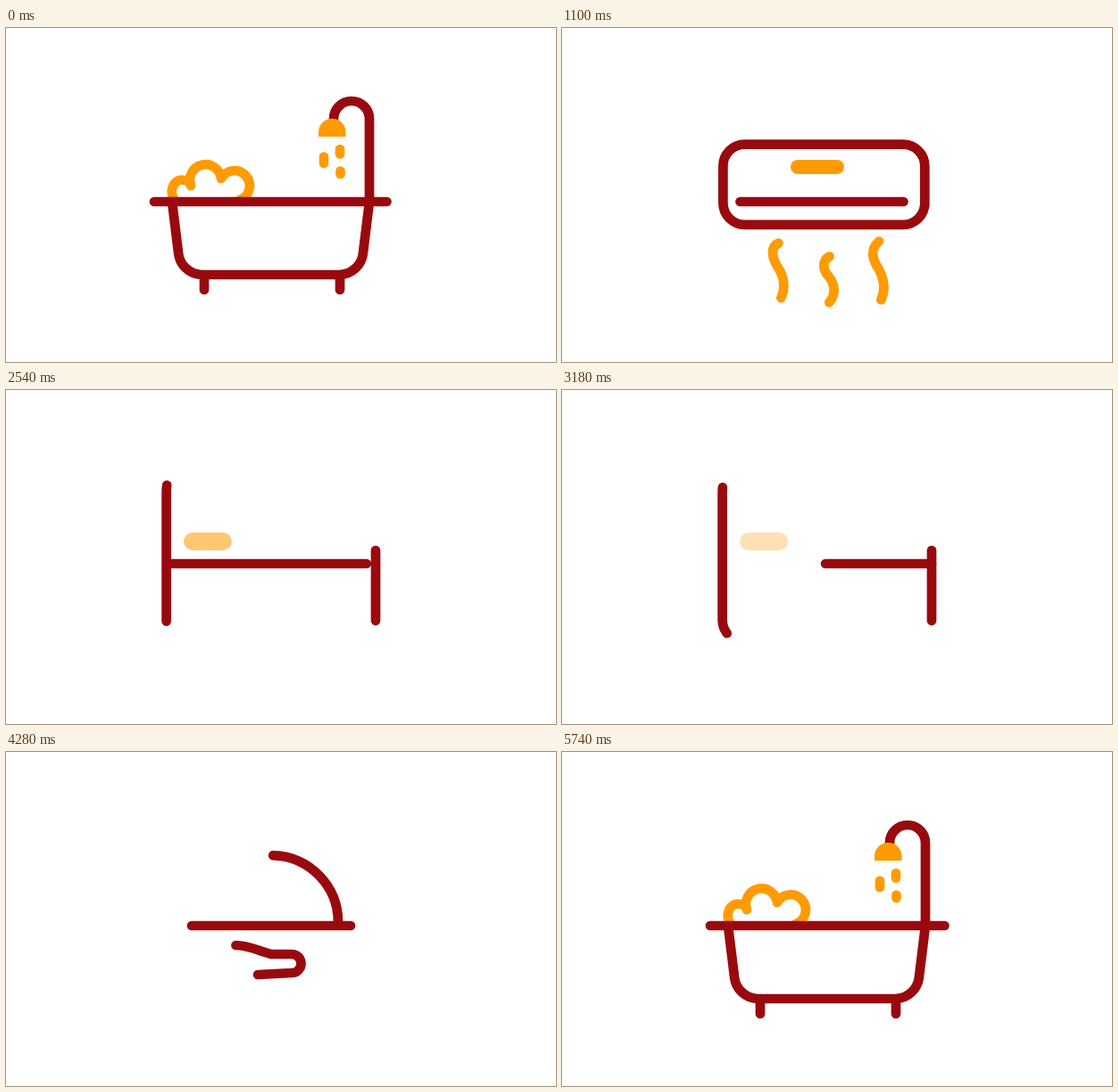
These frames come from a looping animation (616 by 375 pixels, 5.76 s). An HTML page without scripts:

```html
<!DOCTYPE html>
<html lang="en">
<head>
<meta charset="utf-8">
<title>Hotel comforts</title>
<style>
html, body { margin: 0; width: 100%; height: 100%; overflow: hidden; background: #fff; }
svg { display: block; width: 616px; height: 375px; }
path, circle { animation: 5.76s ease-in-out infinite; }
.line {
  fill: none; stroke: #990a0e; stroke-width: 10.7;
  stroke-linecap: round; stroke-linejoin: round;
  stroke-dasharray: 0 999; visibility: hidden;
}
.warm { stroke: #ff9b00; }
.fill { fill: #ff9b00; opacity: 0; }
.solid { stroke-dasharray: none; visibility: visible; opacity: 0; }

/* shared horizontal bar */
.rail { animation-name: rail; stroke-dasharray: none; }
@keyframes rail {
  0% { d: path("M166 195H426.5"); visibility: visible; }
  11.1% { d: path("M167.5 195H424.5"); }
  18.4%, 29% { d: path("M199.5 195H382.5"); visibility: visible; }
  35.5% { d: path("M382 195H382.5"); visibility: hidden; }
  39% { d: path("M180 195H180.5"); visibility: hidden; }
  45%, 52.5% { d: path("M180 195H414"); visibility: visible; }
  55.2% { d: path("M295 195H414"); visibility: visible; }
  58% { d: path("M413.5 195H414"); visibility: hidden; }
  60% { d: path("M208 195H208.5"); visibility: hidden; }
  66%, 74.3% { d: path("M208 195H386"); visibility: visible; }
  80.5% { d: path("M169.5 195H424.7"); }
  84%, 100% { d: path("M166 195H428.5"); visibility: visible; }
}

/* bath */
.tub { animation-name: tub; }
@keyframes tub {
  0%, 88%, 100% { stroke-dasharray: 101 999; stroke-dashoffset: 0; visibility: visible; }
  10.4% { stroke-dasharray: 0 999; stroke-dashoffset: -100; visibility: hidden; }
  77.5% { stroke-dasharray: 0 999; stroke-dashoffset: 0; visibility: hidden; }
}
.pipe { animation-name: pipe; }
@keyframes pipe {
  0%, 83%, 100% { stroke-dasharray: 101 999; visibility: visible; }
  10.4%, 76% { stroke-dasharray: 0 999; visibility: hidden; }
}
.foot { animation-name: foot; }
@keyframes foot {
  0%, 89.5%, 100% { stroke-dasharray: 101 999; visibility: visible; }
  5%, 86% { stroke-dasharray: 0 999; visibility: hidden; }
}
.cloud { animation-name: cloud; }
@keyframes cloud {
  0%, 92.5%, 100% { stroke-dasharray: 101 999; visibility: visible; }
  8%, 84% { stroke-dasharray: 0 999; visibility: hidden; }
}
.head { animation-name: head; transform-origin: 365px 103px; }
@keyframes head {
  0%, 87%, 100% { opacity: 1; transform: none; }
  6%, 83% { opacity: 0; transform: scale(.3); }
}
.drop { animation-name: drop; }
@keyframes drop {
  0%, 97%, 100% { opacity: 1; transform: none; }
  5% { opacity: 0; transform: translateY(8px); }
  89% { opacity: 0; transform: translateY(-18px); }
}

/* air conditioner */
.case { animation-name: case; }
@keyframes case {
  11% { stroke-dasharray: 0 999; visibility: hidden; }
  18.7%, 28.5% { stroke-dasharray: 101 999; stroke-dashoffset: 0; visibility: visible; }
  36% { stroke-dasharray: 0 999; stroke-dashoffset: -97; visibility: hidden; }
}
/* --in: share drawn at first, --out: share erased later */
.wave { animation-name: wave; }
@keyframes wave {
  13.5% { stroke-dasharray: 0 999; visibility: hidden; }
  19.1% { stroke-dasharray: var(--in) 999; visibility: visible; }
  21%, 29.5% { stroke-dasharray: 101 999; stroke-dashoffset: 0; visibility: visible; }
  36.1% { stroke-dasharray: 101 999; stroke-dashoffset: calc(-1px * var(--out)); visibility: visible; }
  37.5% { stroke-dasharray: 101 999; stroke-dashoffset: -100px; visibility: hidden; }
}
.button { animation-name: button; stroke-width: 16; }
@keyframes button {
  0%, 14%, 34%, 100% { opacity: 0; }
  18%, 30% { opacity: 1; }
}

/* bed */
.post { animation-name: post; }
@keyframes post {
  33% { stroke-dasharray: 0 999; stroke-dashoffset: 0; visibility: hidden; }
  36.1% { stroke-dasharray: 126 999; stroke-dashoffset: -153; visibility: visible; }
  40%, 54.2% { stroke-dasharray: 153 999; stroke-dashoffset: -237.5; visibility: visible; }
  55.2% { stroke-dasharray: 165 999; stroke-dashoffset: -240; visibility: visible; }
  59.6% { stroke-dasharray: 0 999; stroke-dashoffset: -524; visibility: hidden; }
}
.end { animation-name: end; }
@keyframes end {
  35.7% { stroke-dasharray: 0 999; stroke-dashoffset: 0; visibility: hidden; }
  36.1% { stroke-dasharray: 10 999; stroke-dashoffset: 0; visibility: visible; }
  42.5%, 56% { stroke-dasharray: 79 999; stroke-dashoffset: -246; visibility: visible; }
  60.8% { stroke-dasharray: 170 999; stroke-dashoffset: -330; visibility: visible; }
  66% { stroke-dasharray: 0 999; stroke-dashoffset: -630; visibility: hidden; }
}
.pillow { animation-name: pillow; stroke-width: 20; }
@keyframes pillow {
  0%, 42%, 56%, 100% { opacity: 0; }
  46%, 53% { opacity: 1; }
  55.2% { opacity: .3; }
}

/* served dish */
.dome { animation-name: dome; }
@keyframes dome {
  61.5% { stroke-dasharray: 0 999; visibility: hidden; }
  67.5%, 72.2% { stroke-dasharray: 101 999; stroke-dashoffset: 0; visibility: visible; }
  76.4% { stroke-dasharray: 0 999; stroke-dashoffset: -100; visibility: hidden; }
}
.thumb { animation-name: thumb; }
@keyframes thumb {
  62.5% { stroke-dasharray: 0 999; visibility: hidden; }
  68.5%, 72% { stroke-dasharray: 188 999; stroke-dashoffset: 0; visibility: visible; }
  74.3% { stroke-dasharray: 137 999; stroke-dashoffset: -51; visibility: visible; }
  78% { stroke-dasharray: 0 999; stroke-dashoffset: -186; visibility: hidden; }
}
.palm { animation-name: palm; }
@keyframes palm {
  59% { stroke-dasharray: 0 999; visibility: hidden; }
  67%, 70.8% { stroke-dasharray: 101 999; stroke-dashoffset: 0; visibility: visible; }
  74.2% { stroke-dasharray: 0 999; stroke-dashoffset: -100; visibility: hidden; }
}
.knob { animation-name: knob; }
@keyframes knob {
  0%, 66%, 73.5%, 100% { opacity: 0; }
  69%, 71% { opacity: 1; }
}
</style>
</head>
<body>
<svg viewBox="0 0 616 375">
  <g>
    <path class="line warm cloud" pathLength="100" d="M188 192C182 181 189 170.5 197 170.5C203 170.5 206 173 207 177A17.6 17.6 0 1 1 241 169A17 17 0 1 1 262 193"/>
    <path class="line tub" pathLength="100" d="M186 195L193 252A27 27 0 0 0 219 277H374A27 27 0 0 0 400 252L407 195"/>
    <path class="line foot" pathLength="100" d="M222 277V294"/>
    <path class="line foot" pathLength="100" d="M374 277V294"/>
    <path class="line pipe" pathLength="100" d="M407 195V102A20 20 0 0 0 367 102V106"/>
    <path class="line warm solid drop" d="M356 144.5V152"/>
    <path class="line warm solid drop" d="M374 136V141.5"/>
    <path class="line warm solid drop" d="M374.5 160.5V164"/>
    <path class="fill head" d="M350 122V117A15.2 15.2 0 0 1 380.5 117V122Z"/>
  </g>
  <g>
    <path class="line case" pathLength="100" d="M406.3 200V155A24.3 24.3 0 0 0 382 130.7H204.7A24.3 24.3 0 0 0 180.4 155V196.6A24.3 24.3 0 0 0 204.7 220.9H382A24.3 24.3 0 0 0 406.3 196.6"/>
    <path class="line warm solid button" d="M264 156H308"/>
    <path class="line warm wave" style="--in:97;--out:70" pathLength="100" d="M242.5 241.5C232 246 236 260 242 269C249 280 251 292 244.5 305"/>
    <path class="line warm wave" style="--in:89;--out:84" pathLength="100" d="M299.5 256.5C290 262 293 273 298 278C305 286 310 301 294 313"/>
    <path class="line warm wave" style="--in:83;--out:90" pathLength="100" d="M355 239.5C345 248 348 259 352 266C361 280 366 300 349 317"/>
  </g>
  <g>
    <path class="line warm solid pillow" d="M209 170H243"/>
    <path class="line post" d="M328 130V116A74.2 74.2 0 0 0 179.6 116V258A25 25 0 0 0 204.6 283H300"/>
    <path class="line end" d="M383 221C400 221 408 212 422 206C446 198 462 212 462 240V282A24 24 0 0 1 414 282V179A98 98 0 0 0 316 81A94 109 0 0 0 222 190"/>
  </g>
  <g>
    <circle class="fill knob" cx="297" cy="102" r="8"/>
    <path class="line dome" pathLength="100" d="M222 191A75 75 0 0 1 372 191"/>
    <path class="line thumb" d="M208 228Q232 217 257 217C272 217 282 223 297 227H320A10.5 10.5 0 0 1 320 248L282 250"/>
    <path class="line palm" pathLength="100" d="M208 283H280C305 283 318 282 336 269L378 238C388 230 380 219 366 224L331 242"/>
  </g>
  <path class="line rail" d="M166 195H426.5"/>
</svg>
</body>
</html>
```
